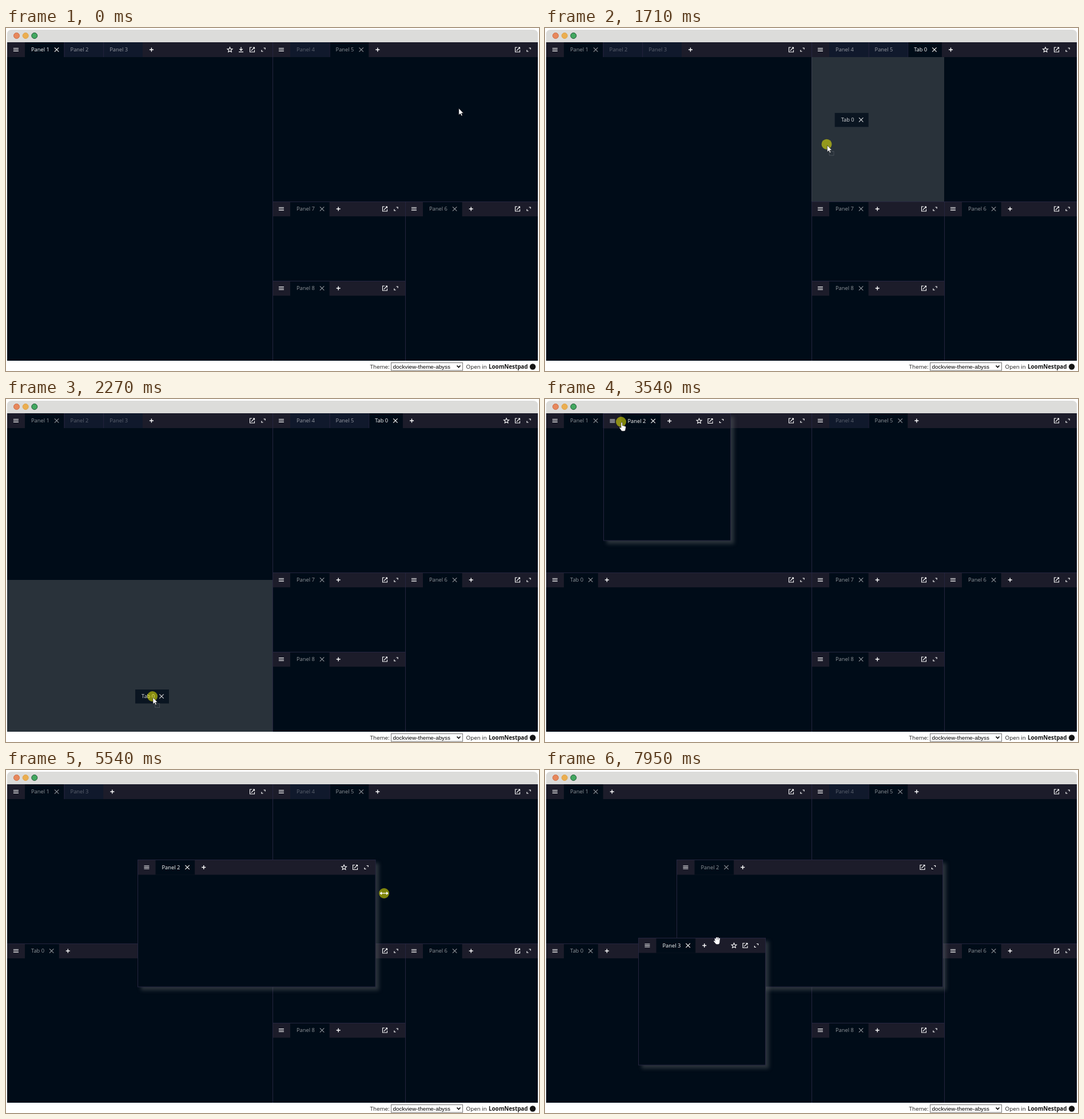
An HTML page for the animation above (8 s loop, 932 by 601 pixels).

```html
<!DOCTYPE html>
<html>
<head>
<meta charset="utf-8">
<style>
html, body { margin: 0; width: 100%; height: 100%; overflow: hidden; background: #fff; }
svg { display: block; font: 9.3px "Open Sans", "Noto Sans", sans-serif; }
.ui { fill: none; stroke: #fff; }
.shadow { filter: drop-shadow(6px 6px 3px rgba(83, 89, 93, .5)); }
</style>
</head>
<body>
<svg id="stage" width="932" height="601" viewBox="0 0 932 601"></svg>
<script>
const LOOP = 8000;
const LAG = 70;               // dragged things trail the pointer
const BG = '#000c18', BAR = '#1c1c2a', HIDDEN = '#10192c', LINE = '#25253f', SHADE = 'rgba(83,89,93,.5)';
const DIM = .57;              // text of hidden tabs and of inactive groups
const SIZE = 222.5, GRIP = [31, 15];

// Moments of the story
const ADD = 960, LIFT = 1300, DROP = 2660, FLOAT2 = 3540, RELEASE2 = 4240,
  SIZE_FROM = 5040, SIZE_TO = 5950, FLOAT3 = 6710, RELEASE3 = 7460;
const PRESSES = [[760, ADD], [LIFT, DROP], [3290, RELEASE2], [SIZE_FROM, SIZE_TO], [6640, RELEASE3]];

const easeOut = u => 1 - (1 - u) ** 2.5;

// Pointer moves: start, end, x, y, easing; it rests in between
const START = [791, 139];
const MOVES = [
  [0, 760, 646, 38],                      // to the plus button
  [1100, 1250, 664, 38],                  // to the new tab
  [1440, 1710, 493, 203],
  [1710, 2200, 256, 521],                 // tab into the left group
  [DROP, 3290, 133, 40],                  // to Panel 2
  [3620, 3970, 261, 172, easeOut],
  [RELEASE2, 4940, 453, 216],             // to its right edge
  [SIZE_FROM, 5625, 696, 216],
  [SIZE_TO, 6640, 133, 40],               // to Panel 3
  [6640, 7190, 194, 309, easeOut],
  [RELEASE3, 7950, 301, 299]
];

// Outlines around the centre or hot spot: path, line width
const ICONS = {
  menu: ['M-4.5-2.5h9M-4.5 0h9M-4.5 2.5h9', 1.1],
  plus: ['M-3.5 0h7M0-3.5v7', 1.4],
  close: ['M-3.7-3.7l7.4 7.4M3.7-3.7l-7.4 7.4', 1.1],
  popout: ['M-.5-4h-3.5v8h8v-3.5M1.3-4h2.7v2.7M4-4L-1.8 1.8', 1.1],
  expand: ['M.5-3h2.6v2.6M-.5 3h-2.6v-2.6', 1.2],
  star: ['M0-4.4L1.3-1.4 4.5-1.2 2.1.9 2.8 4 0 2.4-2.8 4-2.1.9-4.5-1.2-1.3-1.4z', 1.1],
  download: ['M0-4.5v5.5M-2.7-1.3L0 1.4 2.7-1.3M-4 3.8h8', 1.3]
};
const CURSORS = {
  arrow: '<path d="M1 2v11.5l2.7-2.4 1.8 4 1.8-.8-1.8-3.9h3.5z" fill="#fff" stroke="#000" stroke-width=".5"/>',
  hand: '<path d="M0 2a1.2 1.2 0 0 1 2.4 0v4.5l5 1.2q1.2.4 1 2l-.8 4.5q-.3 2-2 2h-3.6q-1 0-1.8-1.2l-3-4.2q-.6-1.6 1-1.4l1.8 1z" fill="#fff" stroke="#000" stroke-width=".5"/>',
  grab: '<path d="M-3.4-3l1 4M-1-5l.3 6M1.5-5l-.1 6M4-3.5l-.7 5M-5 1l3 3.5" stroke="#fff" stroke-width="1.9" stroke-linecap="round"/><ellipse cx=".6" cy="2.4" rx="3.7" ry="3.9" fill="#fff"/>',
  resize: '<path d="M-5 0h10" stroke="#fff" stroke-width="1.3"/><path d="M-7.5 0l3.5-3v6zM7.5 0L4-3v6z" fill="#fff"/>'
};

const within = (t, a, b) => t >= a && t < b;
const clamp = (v, a, b) => Math.min(Math.max(v, a), b);

function pointer(t) {
  let [x, y] = START;
  for (const [from, to, toX, toY, ease = u => u] of MOVES) {
    const u = ease(clamp((t - from) / (to - from), 0, 1));
    x += (toX - x) * u;
    y += (toY - y) * u;
  }
  return [x, y];
}

// Corner of a floating window that hangs on the pointer until its release
const hung = (t, release) => pointer(Math.min(t, release) - LAG).map((v, i) => v - GRIP[i]);

function resized(t) {
  const xAt = time => pointer(time)[0];
  return SIZE + xAt(clamp(t - LAG / 2, SIZE_FROM, SIZE_TO)) - xAt(SIZE_FROM);
}

const rect = (x, y, w, h, fill, more = '') => `<rect x="${x}" y="${y}" width="${w}" height="${h}" fill="${fill}" ${more}/>`;
const text = (x, y, str, more = '') => `<text x="${x}" y="${y}" ${more}>${str}</text>`;
const icon = (name, x, y, alpha = 1) =>
  `<path class="ui" transform="translate(${x} ${y})" d="${ICONS[name][0]}" stroke-width="${ICONS[name][1]}" opacity="${alpha}"/>`;

// Tab strip of a group; the tab at index `open` is shown
function header(x, y, right, tabs, open, active, extra = []) {
  const mid = y + 13;
  let out = rect(x, y, right - x, 26, BAR) + icon('menu', x + 15.4, mid), at = x + 31;
  tabs.forEach((name, i) => {
    const w = name.startsWith('Tab') ? 59.7 : 68.6;
    const alpha = (active ? 1 : DIM) * (i === open ? 1 : DIM);
    out += rect(at, y, w, 26, i === open ? BG : HIDDEN);
    if (i) out += rect(at, y, 1, 26, LINE);
    out += text(at + 11, mid + 3.4, name, `fill="#fff" fill-opacity="${alpha}"`);
    if (i === open) out += icon('close', at + w - 13, mid, alpha);
    at += w;
  });
  out += icon('plus', at + 15.6, mid);
  ['expand', 'popout', ...(active ? extra : [])].forEach((n, i) => out += icon(n, right - 16 - i * 19.5, mid));
  return out;
}

function floating([x, y], w, name, active, dragged) {
  return `<g opacity="${dragged ? .5 : 1}">` + rect(x, y, w, SIZE + .5, BG, 'class="shadow"') +
    header(x + .5, y + .5, x + w, [name], 0, active, ['star']) +
    rect(x + .5, y + .5, w - .5, SIZE, 'none', `stroke="${LINE}"`) + '</g>';
}

// Drop preview: whole group in the middle, half of it near an edge
function dropZone(px, py) {
  if (py < 51) return '';
  let [x, y, w, h] = px < 466 ? [2, 51, 464, 532] : [466, 51, 464, 253];
  const fx = (px - x) / w, fy = (py - y) / h;
  if (fx < .2 || fx > .8) { w /= 2; if (fx > .8) x += w; }
  else if (fy < .2 || fy > .8) { h /= 2; if (fy > .8) y += h; }
  return rect(x, y, w, h, SHADE);
}

function draggedTab([x, y]) {
  return rect(x - 30, y - 12, 59, 24.5, '#0a1521') +
    text(x - 19, y + 3.4, 'Tab 0', 'fill="#fff" fill-opacity=".85"') + icon('close', x + 16, y, .85);
}

function cursorName(t, px, py, edge) {
  if (within(t, LIFT, DROP)) return 'arrow';
  if (py < 48) return 'hand';
  if (t > RELEASE2 && Math.abs(px - edge) < 20 && py > 160) return 'resize';
  return t > RELEASE3 ? 'grab' : 'arrow';
}

function makeChrome() {
  const dot = (x, fill, edge) => `<circle cx="${x}" cy="13.5" r="5" fill="${fill}" stroke="${edge}"/>`;
  return '<path d="M2 25V11q0-8 8-8h912q8 0 8 8v14z" fill="#dcdcda"/>' +
    dot(18.5, '#e7885c', '#cf6f48') + dot(34.2, '#ebae50', '#e0a24a') + dot(49.8, '#43a860', '#1f5735') +
    rect(2, 25, 928, 558, BG) +
    '<g font-size="9.8" fill="#1c1c1c">' + text(636.5, 597.3, 'Theme:') + text(804.5, 597.3, 'Open in') +
    text(844, 597.3, 'LoomNestpad', 'font-weight="700" fill="#111"') + '</g>' +
    rect(673.5, 586.5, 125, 13.5, '#fff', 'stroke="#767676"') +
    text(676.5, 596.7, 'dockview-theme-abyss', 'font-family="Liberation Sans, Arial, sans-serif" font-size="9.9"') +
    '<path d="M788.5 591.5l3 3 3-3" fill="none" stroke="#000" stroke-width="1.6"/>' +
    '<circle cx="921" cy="593.5" r="5.2" fill="#151515"/>';
}
const chrome = makeChrome();

function docked(t) {
  const leftTabs = ['Panel 1'], rightTabs = ['Panel 4', 'Panel 5'];
  if (t < FLOAT2) leftTabs.push('Panel 2');
  if (t < FLOAT3) leftTabs.push('Panel 3');
  if (within(t, ADD, DROP)) rightTabs.push('Tab 0');
  let out = header(2, 25, 466, leftTabs, 0, t < ADD, ['download', 'star']) +
    header(466, 25, 930, rightTabs, rightTabs.length - 1, within(t, ADD, DROP), ['star']) +
    header(466, 304, 698, ['Panel 7'], 0) +
    header(698, 304, 930, ['Panel 6'], 0) +
    header(466, 443, 698, ['Panel 8'], 0);
  if (t >= DROP) out += header(2, 304, 466, ['Tab 0'], 0, t < FLOAT2, ['star']) + rect(2, 304, 464, 1, LINE);
  return out + rect(466, 25, 1, 558, LINE) + rect(698, 304, 1, 279, LINE) +
    rect(466, 304, 464, 1, LINE) + rect(466, 443, 232, 1, LINE);
}

function draw(t) {
  const [px, py] = pointer(t), corner2 = hung(t, RELEASE2), width2 = resized(t);
  const tabDrag = within(t, LIFT, DROP);
  let out = chrome + docked(t);
  if (t >= FLOAT2) out += floating(corner2, width2, 'Panel 2', t < FLOAT3, within(t, FLOAT2 + 2 * LAG, RELEASE2));
  if (t >= FLOAT3) out += floating(hung(t, RELEASE3), SIZE, 'Panel 3', true, within(t, FLOAT3 + LAG, RELEASE3));
  if (tabDrag) out += dropZone(px, py) + draggedTab(pointer(t - LAG));
  if (PRESSES.some(p => within(t, ...p))) out += `<circle cx="${px}" cy="${py}" r="9" fill="#ff0" fill-opacity=".5"/>`;
  if (tabDrag) out += rect(px + 4.5, py + 12.5, 8, 7, 'none', 'stroke="#7d8388" stroke-width=".7" stroke-dasharray="1 1"');
  const cursor = CURSORS[cursorName(t, px, py, corner2[0] + width2)];
  return out + `<g transform="translate(${px} ${py})">${cursor}</g>`;
}

const stage = document.getElementById('stage');
let shown = '';
function tick() {
  const next = draw(performance.now() % LOOP);
  if (next !== shown) stage.innerHTML = shown = next;
  requestAnimationFrame(tick);
}
tick();
</script>
</body>
</html>
```
